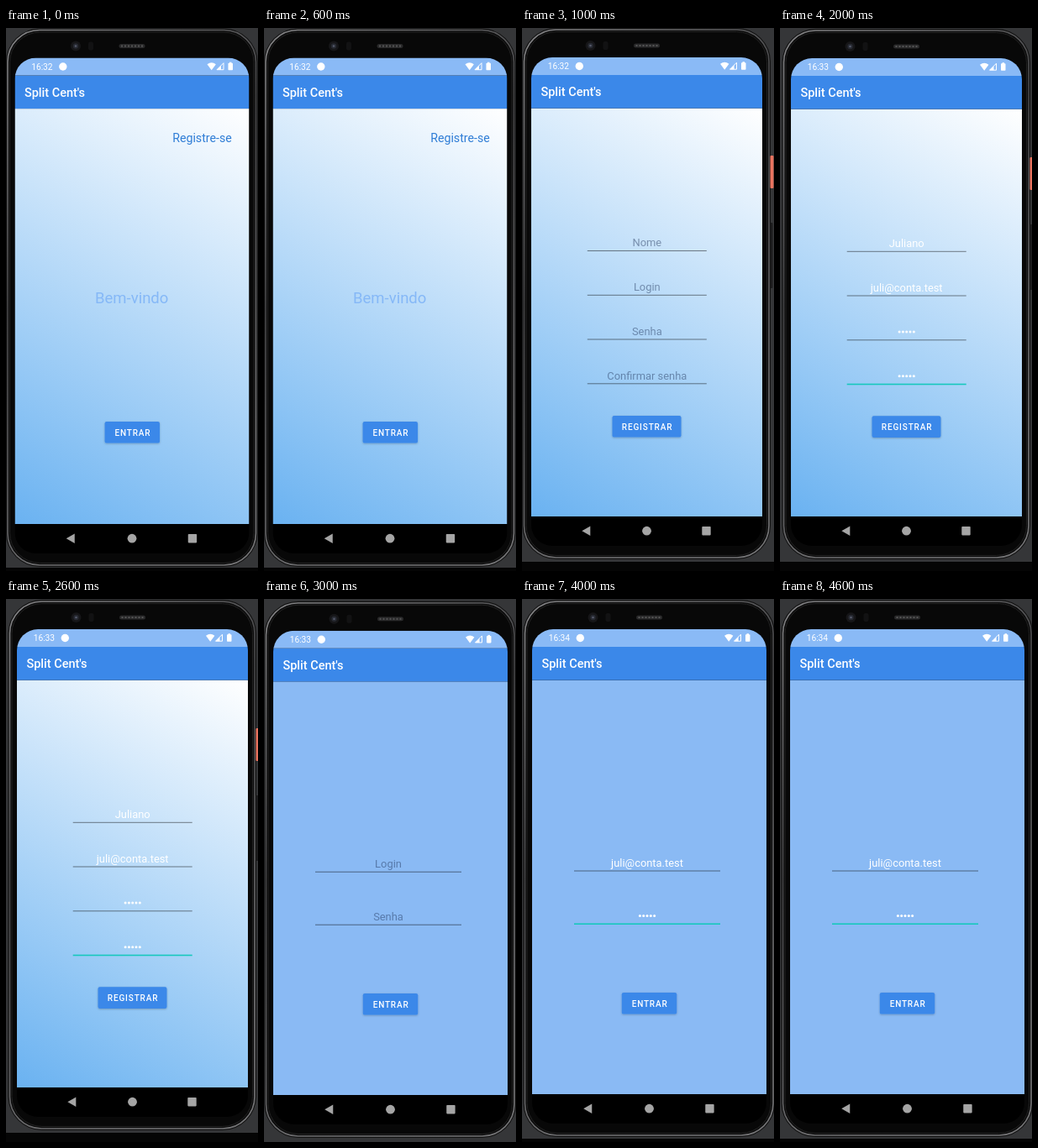
An HTML page that plays this animation: 300x647 px, repeating every 5000 ms.

```html
<!DOCTYPE html>
<html lang="pt">
<head>
<meta charset="utf-8">
<style>
html, body { margin: 0; width: 100%; height: 100%; overflow: hidden; background: #353638; }
svg { display: block; width: 300px; height: 647px; font-family: Roboto, sans-serif; }
</style>
</head>
<body>
<svg id="stage" viewBox="0 0 300 647"></svg>
<script>
const stage = document.getElementById('stage');
const MAIL = 'juli@conta.test';
const DOTS = '•••••';

// l, r, t: screen edges; nav: top of the navigation bar; floor: top of the black strip
const scenes = [
  { l: 10.5, r: 289.5, t: 35.5, nav: 591, floor: 643, time: '16:32', fade: true,
    button: ['ENTRAR', 150.3, 469, 65.5], welcome: true },
  { l: 11, r: 286, t: 35, nav: 582, floor: 636, time: '16:32', fade: true,
    button: ['REGISTRAR', 148.5, 462, 82], side: 152,
    form: { x: 148.8, w: 142, y: [265.5, 318.3, 371, 423.8], hints: ['Nome', 'Login', 'Senha', 'Confirmar senha'] } },
  { l: 13, r: 288, t: 36, nav: 582, floor: 636, time: '16:33', fade: true,
    button: ['REGISTRAR', 150.5, 462.3, 82], side: 154,
    form: { x: 150.7, w: 142, y: [266.3, 319, 371.8, 424.5], values: ['Juliano', MAIL, DOTS, DOTS] } },
  { l: 11, r: 290, t: 37.7, nav: 591, floor: 647, time: '16:33',
    button: ['ENTRAR', 150.5, 470, 65.5],
    form: { x: 148, w: 174, y: [325.2, 388.2], hints: ['Login', 'Senha'] } },
  { l: 12, r: 291, t: 36, nav: 590, floor: 643, time: '16:34',
    button: ['ENTRAR', 151.5, 469, 65.5],
    form: { x: 149, w: 174, y: [324, 387.2], values: [MAIL, DOTS] } }
];

const rect = (x, y, w, h, fill, extra = '') =>
  `<rect x="${x}" y="${y}" width="${w}" height="${h}" fill="${fill}" ${extra}/>`;
const circle = (x, y, r, fill, extra = '') =>
  `<circle cx="${x}" cy="${y}" r="${r}" fill="${fill}" ${extra}/>`;
const path = (d, fill, extra = '') => `<path d="${d}" fill="${fill}" ${extra}/>`;
const text = (s, x, y, size, fill, extra = '') =>
  `<text x="${x}" y="${y}" font-size="${size}" fill="${fill}" ${extra}>${s}</text>`;
const MID = 'text-anchor="middle"';

function phone({ l, r, t, nav, floor, side }) {
  const c = (l + r) / 2, x = l - 9, w = r - l + 17.5, y = t - 33.5, h = nav + 49.5 - y;
  let s = rect(0, floor, 300, 647 - floor, '#050505');
  s += rect(x, y, w, h, '#0b0b0b', 'rx="39" stroke="#111" stroke-width="3"');
  s += rect(x + .5, y + .5, w - 1, h - 1, '#0b0b0b', 'rx="38" stroke="url(#metal)" stroke-width="1.6"');
  s += rect(x + 3, y + 3, w - 6, h - 6, '#080808', 'rx="36" stroke="#222" stroke-width="1"');
  if (side) {
    s += rect(r + 9.5, side, 4, 39, '#ea7460', 'rx="1"');
    s += rect(r + 9.5, side + 80, 3, 78, '#1c1c1d', 'rx="1"');
  }
  const cam = c - 67, cy = t - 14;
  s += circle(cam, cy, 6, '#161618') + circle(cam, cy, 3.2, '#272a32') + circle(cam, cy, 1.3, '#55596a');
  s += rect(cam + 15, cy - 5, 6, 10, '#121213', 'rx="2"');
  s += rect(c - 15.5, cy - 2.5, 31, 5, '#29292a', 'rx="2.5"');
  s += path(`M${c - 13} ${cy}h27`, 'none', 'stroke="#555" stroke-width="2" stroke-dasharray="2 2"');
  return s;
}

function statusBar({ l, r, t, time }) {
  const y = t + 10.2, x = r - 50;
  return text(time, l + 19.7, t + 14.2, 10.2, '#fff')
    + circle(l + 57.3, y + .3, 4.7, '#fff')
    + path(`M${x} ${y - 2.5}q5.2 -4 10.4 0l-5.2 7z`, '#fff')
    + path(`M${x + 11.5} ${y + 4}l8 -8v8z`, 'none', 'stroke="#fff"')
    + path(`M${x + 11.5} ${y + 4}l5 -5v5z`, '#fff')
    + rect(x + 25, y - 4, 5.5, 8.5, '#fff', 'rx=".8"')
    + rect(x + 26.5, y - 5, 2.5, 2, '#fff');
}

function navBar({ l, r, nav }) {
  const c = (l + r) / 2, k = (r - l) / 278, y = nav + 17.2;
  const back = c - 78 * k, recent = c + 66.5 * k;
  return path(`M${back} ${y}l10 -5.8v11.6z`, '#a5a5a5')
    + circle(c, y, 5.4, '#a5a5a5')
    + rect(recent, y - 5.2, 10.4, 10.4, '#a5a5a5', 'rx=".8"');
}

function fields({ x, w, y, hints, values }) {
  return y.map((line, i) => {
    const active = values && i === y.length - 1;
    let s = active
      ? rect(x - w / 2, line - .8, w, 1.6, '#16c8bd')
      : rect(x - w / 2, line - .5, w, 1, '#000', 'opacity=".48"');
    if (hints) return s + text(hints[i], x, line - 5.3, 12.9, '#1c2f55', MID + ' opacity=".46"');
    if (values[i] !== DOTS) return s + text(values[i], x, line - 5.3, 12.9, '#fff', MID);
    for (let d = -2; d <= 2; d++) s += circle(x + d * 4.3, line - 9.8, 1.5, '#fff');
    return s;
  }).join('');
}

function button([label, x, y, w]) {
  return rect(x - w / 2, y, w, 25.6, '#3b88e9', 'rx="2.2" filter="url(#lift)"')
    + text(label, x + .6, y + 16.9, 10, '#fff', MID + ' font-weight="500" letter-spacing=".85"');
}

function draw(s) {
  const { l, r, t, nav } = s, w = r - l, top = t + 60.6;
  let out = `<defs>
    <linearGradient id="sky" gradientUnits="userSpaceOnUse" x1="${r}" y1="${top}" x2="${l}" y2="${nav}">
      <stop stop-color="#fff"/><stop offset="1" stop-color="#6ab2f1"/></linearGradient>
    <linearGradient id="metal" x2=".4" y2="1">
      <stop stop-color="#858587"/><stop offset=".45" stop-color="#454547"/>
      <stop offset="1" stop-color="#757577"/></linearGradient>
    <clipPath id="screen">${rect(l, t, w, nav + 35 - t, '#000', 'rx="25"')}</clipPath>
    <filter id="lift" x="-20%" y="-30%" width="140%" height="180%">
      <feDropShadow dx="0" dy=".8" stdDeviation=".8" flood-opacity=".25"/></filter></defs>`;
  out += phone(s) + '<g clip-path="url(#screen)">';
  out += rect(l, t, w, nav + 35 - t, '#000');
  out += rect(l, top, w, nav - top, s.fade ? 'url(#sky)' : '#8abaf4');
  out += rect(l, t + 21, w, top - t - 21, '#3b88e9');
  out += rect(l, t, w, 21, '#8abaf6') + '</g>';
  out += statusBar(s) + navBar(s);
  out += text("Split Cent's", l + 11.4, t + 46.3, 14.5, '#fff', 'font-weight="500"');
  if (s.welcome) {
    out += text('Registre-se', 268.8, 135.8, 14.2, '#2f7dd6', 'text-anchor="end"');
    out += text('Bem-vindo', 149.7, 327.5, 18.5, '#85b8f7', MID);
  }
  if (s.form) out += fields(s.form);
  stage.innerHTML = out + button(s.button);
}

let shown = -1;
const start = performance.now();
function tick() {
  const i = Math.floor((performance.now() - start) / 1000) % scenes.length;
  if (i !== shown) draw(scenes[shown = i]);
  requestAnimationFrame(tick);
}
tick();
</script>
</body>
</html>
```
